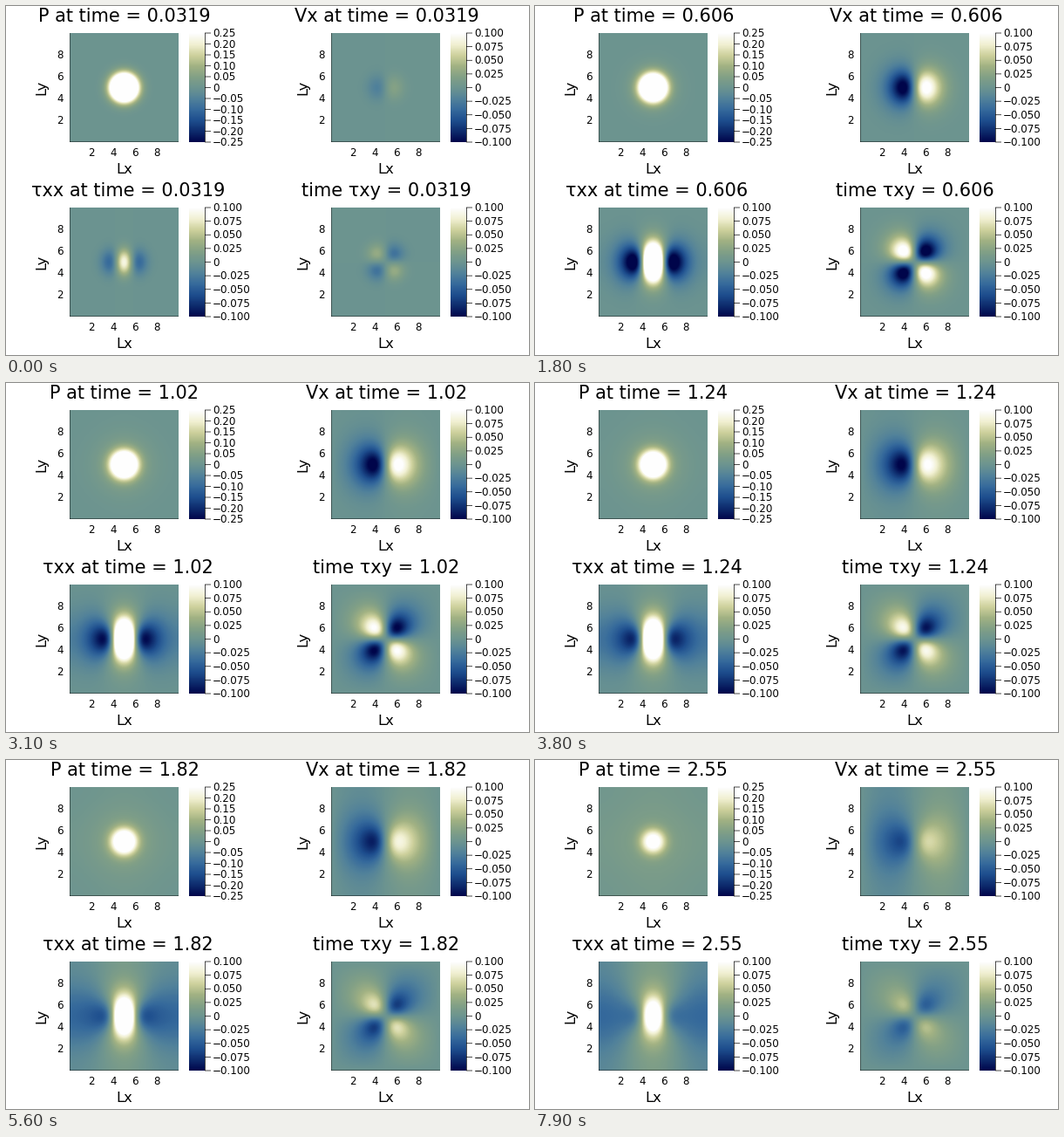
A matplotlib script that plays this animation: 600x400 px, repeating every 8 s.

```python
import numpy as np
import matplotlib.pyplot as plt
from matplotlib.animation import FuncAnimation
from matplotlib.colors import LinearSegmentedColormap

plt.rcParams["font.family"] = "DejaVu Sans"

W, H, DPI = 600, 400, 100
FRAMES, STEP_MS, DT = 80, 100, 0.03189

STOPS = [(0, 5, 74), (14, 44, 110), (30, 78, 142), (54, 106, 156),
         (82, 130, 154), (108, 148, 144), (130, 160, 134), (162, 178, 131),
         (206, 209, 157), (241, 240, 210), (254, 254, 254)]
CMAP = LinearSegmentedColormap.from_list("sea", np.array(STOPS) / 255, N=256)

# Viscous compressible flow from a Gaussian pressure bump in a closed box,
# solved exactly as a sum of cosine modes (unit density).
L, N, MODES = 10.0, 125, 24
AMP, SPREAD, BULK, MU = 1.0, 1.2, 1.0, 1.0

x = (np.arange(N) + 0.5) * L / N
k = np.arange(MODES) * np.pi / L
cos = np.cos(np.outer(x, k))
dcos = -k * np.sin(np.outer(x, k))
ddcos = -k**2 * cos
bump = np.sqrt(np.pi * SPREAD) / L * np.exp(-SPREAD * k**2 / 4) * np.cos(k * L / 2)
bump[1:] *= 2
P0 = AMP * np.outer(bump, bump)
k2 = k[:, None]**2 + k[None, :]**2
gam = MU * k2
root = np.sqrt(gam**2 - BULK * k2 + 1e-9 + 0j)


def fields(t):
    slow, fast = np.exp((root - gam) * t), np.exp(-(root + gam) * t)
    odd = (slow - fast) / (2 * root)
    pk = (P0 * ((slow + fast) / 2 + gam * odd)).real
    phi = -(P0 * odd).real

    def expand(by, coef, bx):
        return by @ coef @ bx.T

    return (expand(cos, pk, cos),
            expand(cos, phi, dcos),
            2 * MU * expand(cos, phi, ddcos),
            2 * MU * expand(dcos, phi, dcos))


fig = plt.figure(figsize=(W / DPI, H / DPI), dpi=DPI, facecolor="white")
ax = fig.add_axes([0, 0, 1, 1])
ax.axis("off")

TICK, LABEL, TITLE = 8.57, 11.8, 15
SIZE = 125


def text(px, py, s, size, ha="center", **kw):
    return ax.text(px, py, s, fontsize=size, ha=ha, va="baseline", **kw)


def line(xs, ys, alpha=1):
    ax.plot(xs, ys, color="black", lw=0.5, alpha=alpha,
            solid_capstyle="butt", snap=False)


def image(data, left, top, width, limit):
    return ax.imshow(data, cmap=CMAP, vmin=-limit, vmax=limit, origin="lower",
                     extent=(left, left + width, top + SIZE, top),
                     aspect="auto", interpolation="nearest")


def panel(left, top, limit, step, digits, title_x):
    bottom, mid = top + SIZE, left + SIZE / 2
    img = image(np.zeros((N, N)), left, top, SIZE, limit)
    line([left + 0.5] * 2, [top, bottom], 0.6)
    line([left, left + SIZE], [bottom - 0.5] * 2, 0.6)
    for v in (2, 4, 6, 8):
        d = v * SIZE / L
        text(left + d, bottom + 15.6, str(v), TICK)
        text(left - 7, bottom - d + 3.8, str(v), TICK, ha="right")
    text(mid, bottom + 35.7, "Lx", LABEL)
    text(left - 27.7, top + SIZE / 2 - 0.4, "Ly", LABEL,
         rotation=90, rotation_mode="anchor")

    bar = left + 137
    ramp = np.linspace(-limit, limit, 250)[:, None]
    image(ramp, bar, top, 18, limit)
    edge = bar + 18
    line([edge + 0.5] * 2, [top, bottom])
    half = round(limit / step)
    for i in range(-half, half + 1):
        y = top + SIZE / 2 * (1 - i / half)
        s = f"{i * step:.{digits}f}".replace("-", "\u2212") if i else "0"
        line([edge, edge + 7], [y, y])
        text(edge + 9, y + 4.2, s, TICK, ha="left")
    return img, text(title_x, top - 13, "", TITLE)


panels = [panel(73, 31, 0.25, 0.05, 2, 136),
          panel(373, 31, 0.1, 0.025, 3, 437),
          panel(73, 231, 0.1, 0.025, 3, 140),
          panel(373, 231, 0.1, 0.025, 3, 436)]
NAMES = ["P at time", "Vx at time", "\u03c4xx at time", "time \u03c4xy"]
ax.set_xlim(0, W)
ax.set_ylim(H, 0)


def update(i):
    t = (i + 1) * DT
    stamp = str(float(f"{t:.3g}"))
    for (img, title), name, data in zip(panels, NAMES, fields(t)):
        img.set_data(data)
        title.set_text(f"{name} = {stamp}")
    return [artist for pair in panels for artist in pair]


anim = FuncAnimation(fig, update, frames=FRAMES, interval=STEP_MS,
                     repeat=True, repeat_delay=0, blit=False)
plt.show()
```
